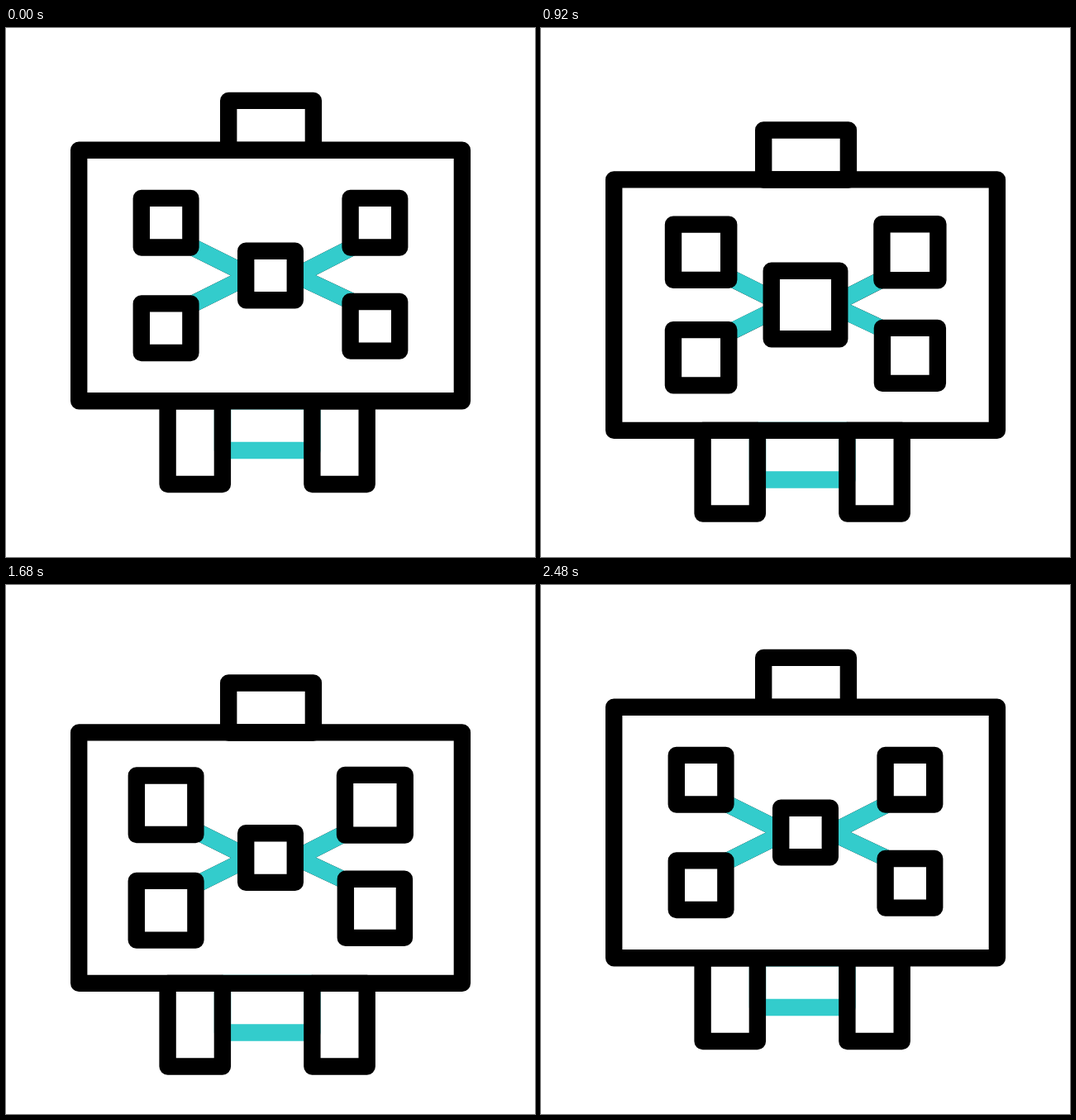
Animation, 640 px wide and 640 px high, one loop 2.56 s. Source, as an HTML page with a canvas:

```html
<!DOCTYPE html>
<html lang="en">
<head>
<meta charset="utf-8">
<title>Presentation board</title>
<style>
html, body { margin: 0; width: 100%; height: 100%; overflow: hidden; background: #fff; }
canvas { display: block; width: 640px; height: 640px; }
</style>
</head>
<body>
<canvas width="640" height="640"></canvas>
<script>
const ctx = document.querySelector('canvas').getContext('2d');
const LOOP = 2560, BLACK = '#000', TEAL = '#33cccc';

// Connectors run from the centre box to an outer box: x1, y1, x2, y2
const links = [
  [290, 297, 223.5, 264],
  [290, 302, 223.5, 335],
  [350, 300.3, 416.5, 266.5],
  [350, 298.8, 416.5, 330]
];

// Outer boxes: centre x, centre y, growth
const nodes = [
  [193.6, 235.7, 25.1],
  [193.6, 363.2, 25.4],
  [446.4, 235.7, 27.6],
  [446.4, 360.8, 24.2]
];

const progress = (t, from, to) => Math.min(1, Math.max(0, (t - from) / (to - from)));
const smooth = p => p * p * (3 - 2 * p);
const pulse = (t, peak, half) => smooth(Math.max(0, 1 - Math.abs(t - peak) / half));

// Symmetric cubic-bezier(a, 0, 1 - a, 1), solved by bisection
function ease(x, a = 0.57) {
  let lo = 0, hi = 1;
  for (let i = 0; i < 20; i++) {
    const s = (lo + hi) / 2, r = 1 - s;
    if (3 * r * r * s * a + 3 * r * s * s * (1 - a) + s * s * s < x) lo = s;
    else hi = s;
  }
  return smooth(lo);
}

function rect(x, y, w, h, fill) {
  ctx.beginPath();
  ctx.rect(x, y, w, h);
  if (fill) {
    ctx.fillStyle = fill;
    ctx.fill();
  }
  ctx.stroke();
}

function box(x, y, size) {
  rect(x - size / 2, y - size / 2, size, size, '#fff');
}

// Draws the part of a connector between fractions a and b
function segment([x1, y1, x2, y2], a, b, color) {
  if (b - a < 0.001) return;
  const dx = x2 - x1, dy = y2 - y1;
  ctx.strokeStyle = color;
  ctx.beginPath();
  ctx.moveTo(x1 + dx * a, y1 + dy * a);
  ctx.lineTo(x1 + dx * b, y1 + dy * b);
  ctx.stroke();
}

function draw(t) {
  ctx.setTransform(1, 0, 0, 1, 0, 0);
  ctx.fillStyle = '#fff';
  ctx.fillRect(0, 0, 640, 640);
  ctx.translate(0, 39.6 * ease(Math.max(0, 1 - Math.abs(t - 1240) / 1200)));
  ctx.lineWidth = 20.4;
  ctx.lineJoin = ctx.lineCap = 'round';

  ctx.strokeStyle = TEAL;
  rect(262, 451.3, 108.4, 59.7);
  ctx.strokeStyle = BLACK;
  rect(195.6, 451.3, 66.3, 100.7);
  rect(370.4, 451.3, 66.3, 100.7);
  rect(269.2, 87.9, 102.7, 60);
  rect(88.2, 147.8, 463.7, 303.5);

  const cleared = smooth(progress(t, 40, 580));
  const refilled = smooth(progress(t, 480, 1040));
  for (const link of links) segment(link, 0, 1, BLACK);
  for (const link of links) {
    segment(link, cleared, 1, TEAL);
    segment(link, 0, refilled, TEAL);
  }

  ctx.strokeStyle = BLACK;
  box(320, 299.5, 59.6 + 25.2 * pulse(t, 1040, 640));
  const outer = pulse(t, 1340, 660);
  for (const [x, y, growth] of nodes) box(x, y, 59.6 + growth * outer);
}

function frame() {
  draw(performance.now() % LOOP);
  requestAnimationFrame(frame);
}
frame();
</script>
</body>
</html>
```
